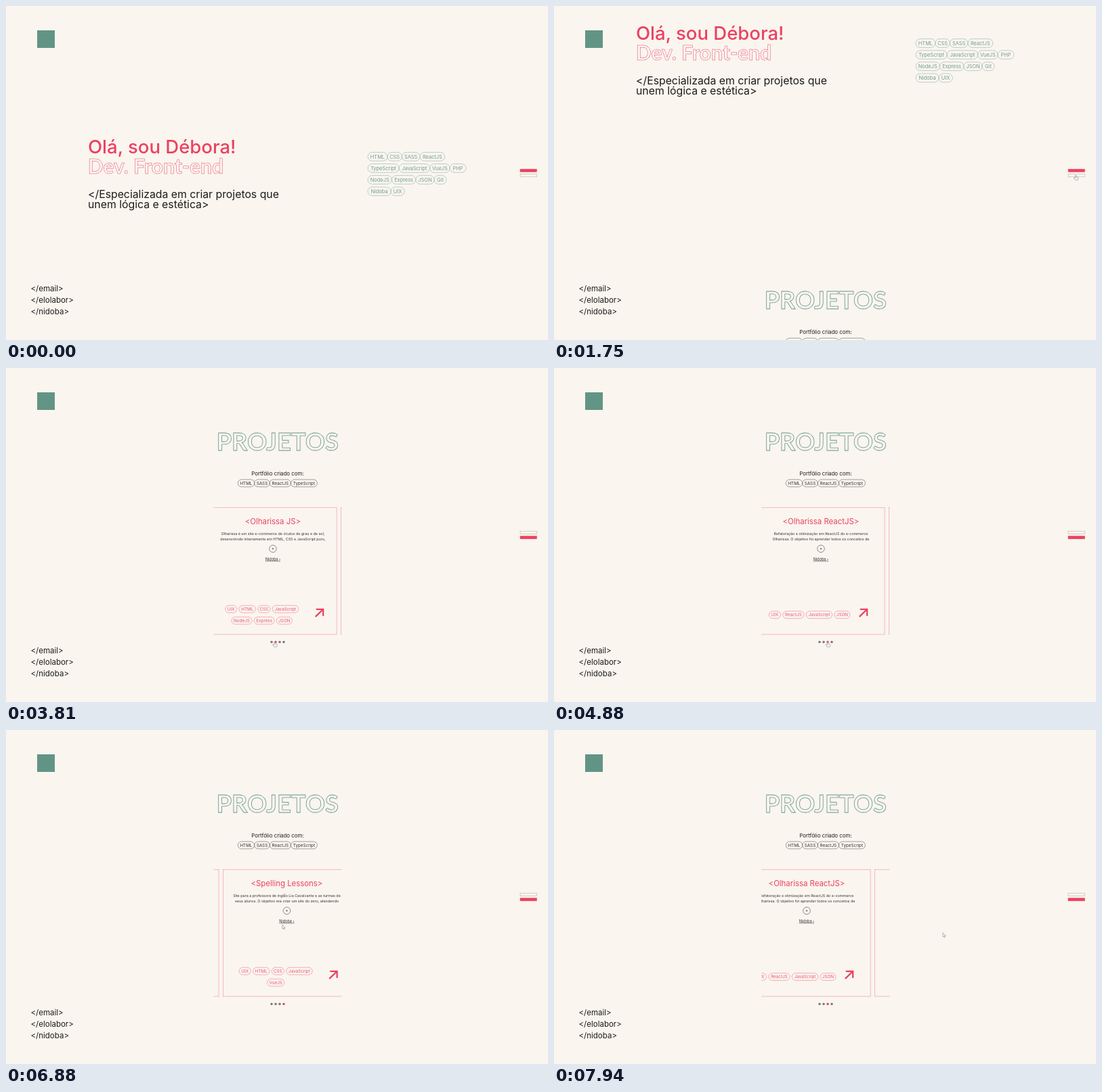
Recreate the animation shown at these times as an HTML page. Size 800 px wide and 494 px high, loop 8000 ms.

```html
<!DOCTYPE html>
<html lang="pt-BR">
<head>
<meta charset="utf-8">
<title>Portfólio</title>
<style>
  html, body { margin: 0; width: 100%; height: 100%; overflow: hidden; background: #faf5ef; }
  svg { display: block; font-family: Inter, sans-serif; }
  .outline { font-family: Lato, sans-serif; font-weight: 700; fill: none; }
</style>
</head>
<body>
<svg id="stage" width="800" height="494" viewBox="0 0 800 494">
  <clipPath id="frame"><rect x="306.3" y="200" width="189.4" height="200"/></clipPath>
  <g id="page"></g>
  <rect x="46" y="36" width="26" height="26" fill="#629486"/>
  <g id="links"></g>
  <g id="toggle" stroke-width=".5">
    <rect x="759" y="241.2" width="24.3" height="4.2"/>
    <rect x="759" y="248.6" width="24.3" height="4.2"/>
  </g>
  <g id="cursor" fill="#fff" stroke="#666" stroke-width=".5" stroke-linejoin="round">
    <path id="arrow" d="M0 0V6L1.4 4.8 2.4 6.8 3.3 6.4 2.4 4.4H4.2Z"/>
    <path id="hand" d="M-.7 .6Q0-.5 .7 .6V3L3.2 3.6Q4 3.9 3.8 5L3.2 7.4H-.6L-2.8 4.6Q-2.6 3.6-1.6 4.2L-.7 5Z"/>
  </g>
</svg>
<script>
const PINK = '#ec4160', GREEN = '#629486', INK = '#1c1c1c', GREY = '#777';
const LOOP = 8000, PITCH = 194.5, PAGE = 494;
const $ = id => document.getElementById(id);

const text = (x, y, size, fill, str, extra = '') =>
  `<text x="${x}" y="${y}" font-size="${size}" fill="${fill}" ${extra}>${str.replace(/</g, '&lt;')}</text>`;
const MID = 'text-anchor="middle"';

// Pill widths at scale 1
const WIDTH = {
  HTML: 24.5, CSS: 18.2, SASS: 22.5, ReactJS: 31.2, TypeScript: 39, JavaScript: 38.6, VueJS: 25,
  PHP: 20.3, NodeJS: 30, Express: 30, JSON: 23, Git: 15.3, Nidoba: 28.8, UIX: 17.2
};
const rowWidth = (names, gap) => names.reduce((sum, n) => sum + WIDTH[n] + gap, -gap);

function pills(list, x, y, color, scale = 1, gap = 0) {
  const h = 10.8 * scale;
  return list.split(' ').map(name => {
    const w = WIDTH[name] * scale, left = x;
    x += w + gap;
    return `<rect x="${left}" y="${y - h / 2}" width="${w}" height="${h}" rx="${h / 2}"
      fill="none" stroke="${color}" stroke-width=".5" opacity=".8"/>` +
      text(left + w / 2, y + 2.3 * scale, 6.3 * scale, color, name, MID + ' opacity=".9"');
  }).join('');
}

const centredPills = (list, mid, y, color) =>
  pills(list, mid - rowWidth(list.split(' '), 3.2) / 2, y, color, 1, 3.2);

const projects = [
  { title: 'Olharissa JS', rows: ['UIX HTML CSS JavaScript', 'NodeJS Express JSON'],
    lines: ['Olharissa é um site e-commerce de óculos de grau e de sol,',
            'desenvolvido inteiramente em HTML, CSS e JavaScript puro,'] },
  { title: 'Olharissa ReactJS', rows: ['UIX ReactJS JavaScript JSON'], arrow: -6,
    lines: ['Refatoração e otimização em ReactJS do e-commerce',
            'Olharissa. O objetivo foi aprender todos os conceitos de'] },
  { title: 'Lista de Tarefas', rows: ['HTML SASS JavaScript', 'TypeScript'],
    lines: ['Site para organizar tarefas do dia a dia em listas,',
            'com filtros por data. O objetivo era praticar'] },
  { title: 'Spelling Lessons', rows: ['UIX HTML CSS JavaScript', 'VueJS'],
    lines: ['Site para a professora de inglês Lia Cavalcante e as turmas de',
            'seus alunos. O objetivo era criar um site do zero, atendendo'] }
];

function card({ title, lines, rows, arrow = 0 }, i) {
  const top = rows.length > 1 ? 356.6 : 365;
  return `<g transform="translate(${i * PITCH})">
    <rect x="306.9" y="206.4" width="188.2" height="187.6" fill="none" stroke="${PINK}" stroke-width=".6" opacity=".55"/>
    ${text(401, 231, 11.4, PINK, `<${title}>`, MID)}
    ${lines.map((line, n) => text(401, 247 + n * 8, 5.4, '#333', line, MID)).join('')}
    <circle cx="401" cy="267.3" r="5.3" fill="none" stroke="#444" stroke-width=".6"/>
    <path d="M399.7 267.3h2.6M401 266v2.6" stroke="#444" stroke-width=".7"/>
    ${text(401, 284.6, 5.5, '#333', 'Nidoba ›', MID + ' text-decoration="underline"')}
    ${rows.map((row, n) => centredPills(row, 384.7 + arrow / 12, top + n * 17, PINK)).join('')}
    <path transform="translate(${arrow})" d="M463.8 367.8 475 357M464.8 356.8H475.2V366.8"
      fill="none" stroke="${PINK}" stroke-width="2.3"/>
  </g>`;
}

const skills = ['HTML CSS SASS ReactJS', 'TypeScript JavaScript VueJS PHP', 'NodeJS Express JSON Git', 'Nidoba UIX'];

$('page').innerHTML =
  text(121, 218, 27.5, PINK, 'Olá, sou Débora!', 'font-weight="500"') +
  text(120.8, 248, 30, 'none', 'Dev. Front-end', `class="outline" stroke="${PINK}" stroke-width=".5"`) +
  text(121, 283.7, 15.8, INK, '</Especializada em criar projetos que') +
  text(121, 298.7, 15.8, INK, 'unem lógica e estética>') +
  skills.map((row, i) => pills(row, 534, 222.8 + i * 17.1, GREEN, 1.18)).join('') +
  `<g transform="translate(0 ${PAGE})">` +
    text(400.8, 122, 36.3, 'none', 'PROJETOS', `class="outline" stroke="${GREEN}" stroke-width=".8" ${MID}`) +
    text(401, 159, 7.9, INK, 'Portfólio criado com:', MID) +
    pills('HTML SASS ReactJS TypeScript', 342.2, 170.4, INK) +
    `<g clip-path="url(#frame)"><g id="track">${projects.map(card).join('')}</g></g><g id="dots">` +
    projects.map((_, i) => `<circle cx="${392 + i * 6}" cy="405.3" r="1.7"/>`).join('') +
  '</g></g>';

$('links').innerHTML = ['email', 'elolabor', 'nidoba']
  .map((name, i) => text(36.5, 422 + i * 17, 11.5, INK, `</${name}>`)).join('');

// Rows of [time, ...values], eased in and out between neighbours
const SCROLL = [[1450, 0], [2210, PAGE]];
const SLIDE = [
  [3750, 0], [4250, PITCH], [4820, PITCH], [5320, 2 * PITCH], [5690, 2 * PITCH], [6190, 3 * PITCH],
  [6820, 3 * PITCH], [7180, 2 * PITCH], [7640, 2 * PITCH], [7940, PITCH + 28]
];
const POINTER = [
  [440, 745, 226], [700, 775, 259], [940, 770, 250], [2300, 770, 250], [2700, 590, 330],
  [3000, 386, 404], [3300, 396.5, 405], [4300, 396.5, 405], [4480, 404, 405], [5250, 404, 405],
  [5440, 409.5, 405], [6380, 409.5, 405], [6750, 394.5, 288], [6820, 394.5, 288],
  [7180, 589, 290], [7640, 407.5, 300], [7940, 574, 300]
];

function at(keys, t) {
  const n = keys.findIndex(k => k[0] > t);
  if (n === 0) return keys[0].slice(1);
  if (n < 0) return keys[keys.length - 1].slice(1);
  const a = keys[n - 1], b = keys[n];
  const p = (1 - Math.cos(Math.PI * (t - a[0]) / (b[0] - a[0]))) / 2;
  return a.slice(1).map((v, i) => v + (b[i + 1] - v) * p);
}

const show = (el, on) => el.setAttribute('visibility', on ? 'visible' : 'hidden');
const move = (id, x, y) => $(id).setAttribute('transform', `translate(${x} ${y})`);

function draw(now) {
  const t = now % LOOP;
  const [scroll] = at(SCROLL, t);
  move('page', 0, -scroll);
  move('track', -at(SLIDE, t)[0], 0);
  move('cursor', ...at(POINTER, t));

  const section = scroll > PAGE / 2 ? 1 : 0;
  [...$('toggle').children].forEach((bar, i) => {
    bar.setAttribute('fill', i === section ? PINK : 'none');
    bar.setAttribute('stroke', i === section ? PINK : '#a3aaa2');
  });

  const active = t >= 7190 ? 2 : [3750, 4820, 5690].filter(s => t >= s).length;
  [...$('dots').children].forEach((dot, i) => dot.setAttribute('fill', i === active ? PINK : GREY));

  const hand = (t > 620 && t < 2400) || (t > 3000 && t < 6450);
  show($('hand'), t >= 440 && hand);
  show($('arrow'), t >= 440 && !hand);
  requestAnimationFrame(draw);
}
requestAnimationFrame(draw);
</script>
</body>
</html>
```
